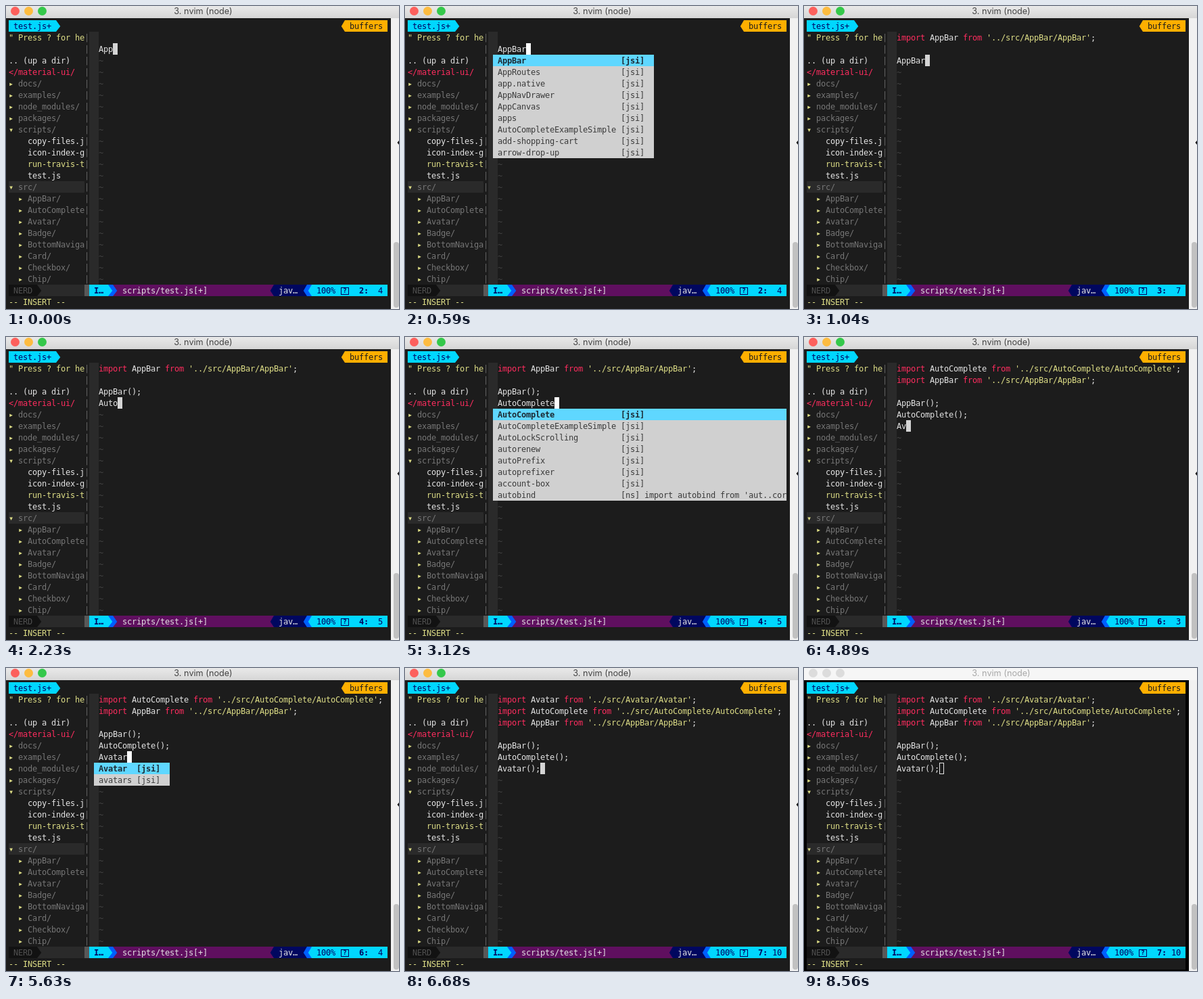
Animation of 581 by 448 pixels, one loop 8.66 s. Source, as an HTML page:

```html
<!DOCTYPE html>
<html lang="en">
<head>
<meta charset="utf-8">
<title>nvim</title>
<style>
html, body { margin: 0; width: 100%; height: 100%; overflow: hidden; }
#win { position: relative; width: 581px; height: 448px; overflow: hidden; background: #1c1c1c; }
#win * { position: absolute; box-sizing: border-box; }
#bar { left: 0; top: 0; width: 581px; height: 18px; background: linear-gradient(#e9e9e9, #d6d6d6); }
#title { left: 1px; width: 581px; top: -1px; text-align: center; color: #444; font: 12.7px/18px Inter, sans-serif; }
.light { top: .5px; width: 13px; height: 13px; border-radius: 50%; }
#scroll { left: 569px; top: 18px; width: 12px; height: 430px; background: #f1f1f1; }
#thumb { left: 4px; top: 331px; width: 8px; height: 97px; border-radius: 4px; background: #c1c1c1; }
#mouse { left: 577px; width: 10px; height: 14px; }
#edge { display: none; left: 0; top: 18px; width: 569px; height: 430px; border: solid #000; border-width: 3px 5px 2px 4px; }
.off #bar { background: #f6f6f6; }
.off #title { color: #a8a8a8; }
.off .light { background: #dcdcdc !important; }
.off #edge { display: block; }
.cell { height: 17px; padding-top: 1px; white-space: pre; overflow: hidden; color: #e4e4e4;
  font: 12px/17px "DejaVu Sans Mono", monospace; letter-spacing: calc(7px - 1ch); }
.yellow { color: #dfdf87; }
.red { color: #ff2d5f; }
.dir { color: #767676; }
.split { color: #666; }
.tilde { color: #444; }
.navy { color: #00005f; }
.bold { font-weight: bold; }
.pum { color: #3a3a3a; background: #d0d0d0; }
.pick { color: #1c2a33; background: #5fd7ff; font-weight: bold; }
.cursor { background: #d4d4d4; }
.bright { background: #fff; }
.hollow { background: none; border: 1px solid #e4e4e4; }
.unknown { left: 495px; top: 416px; width: 12px; height: 11px; border: 1px solid #00005f;
  color: #00005f; font: bold 9px/9px "DejaVu Sans Mono", monospace; text-align: center; }
</style>
</head>
<body>
<div id="win">
  <div id="base"></div>
  <div id="live"></div>
  <div id="edge"></div>
  <div id="bar">
    <div class="light" style="left:6.5px;background:#fc605c"></div>
    <div class="light" style="left:26.5px;background:#fdbc40"></div>
    <div class="light" style="left:46.5px;background:#34c84a"></div>
    <div id="title">3. nvim (node)</div>
  </div>
  <div id="scroll"><div id="thumb"></div></div>
  <svg id="mouse" viewBox="0 0 10 14"><path d="M1 7 6 1V13Z" fill="#000" stroke="#fff" stroke-width=".8"/></svg>
</div>
<script>
const LOOP = 8660, CYAN = '#00d7ff', BLUE = '#005fff', PURPLE = '#5f0f5f', NAVY = '#00075f';
const $ = id => document.getElementById(id);
const base = $('base'), live = $('live');

// Places text on the terminal grid; cells are 7 by 17 pixels.
function put(parent, row, col, text, cls = '', width = text.length) {
  const el = document.createElement('div');
  el.className = 'cell ' + cls;
  el.textContent = text;
  el.style.cssText = `left:${4 + col * 7}px;top:${21 + row * 17}px;width:${width * 7}px`;
  parent.append(el);
  return el;
}
function fill(row, col, width, color, rows = 1) {
  const el = put(base, row, col, '', '', width);
  el.style.background = color;
  el.style.height = rows * 17 + 'px';
}
function arrow(row, col, color, back, left) {
  fill(row, col, 1, back);
  const el = put(base, row, col, '', '', 1);
  el.style.background = color;
  el.style.clipPath = left ? 'polygon(100% 0, 25% 53%, 100% 100%)' : 'polygon(0 0, 90% 53%, 0 100%)';
}

function drawBase() {
  fill(0, 0, 10, CYAN);
  arrow(0, 10, CYAN, '#1c1c1c');
  put(base, 0, 1, 'test.js+', 'navy');
  arrow(0, 70, '#ffaf00', '#1c1c1c', true);
  fill(0, 71, 9, '#ffaf00');
  put(base, 0, 72, 'buffers').style.color = '#1c1c1c';

  fill(1, 17, 2, '#2a2a2a', 22);
  fill(14, 0, 16, '#2a2a2a');
  for (let r = 1; r < 23; r++) put(base, r, 16, '|', 'split');

  put(base, 1, 0, '" Press ? for he', 'yellow');
  put(base, 3, 0, '.. (up a dir)');
  put(base, 4, 0, '</material-ui/', 'red');
  const dir = (row, col, name, open) => {
    put(base, row, col, open ? '▾' : '▸', 'yellow');
    put(base, row, col + 2, name.slice(0, 14 - col), 'dir');
  };
  ['docs/', 'examples/', 'node_modules/', 'packages/'].forEach((d, i) => dir(5 + i, 0, d));
  dir(9, 0, 'scripts/', true);
  ['copy-files.j', 'icon-index-g', 'run-travis-t', 'test.js']
    .forEach((f, i) => put(base, 10 + i, 4, f, i === 2 ? 'yellow' : ''));
  dir(14, 0, 'src/', true);
  ['AppBar/', 'AutoComplete', 'Avatar/', 'Badge/', 'BottomNaviga', 'Card/', 'Checkbox/', 'Chip/']
    .forEach((d, i) => dir(15 + i, 2, d));

  fill(23, 0, 6, '#121212');
  arrow(23, 6, '#121212', '#2a2a2a');
  fill(23, 7, 9, '#2a2a2a');
  fill(23, 16, 1, '#585858');
  put(base, 23, 1, 'NERD').style.color = '#505050';
  fill(23, 17, 4, CYAN);
  put(base, 23, 18, 'I…', 'navy bold');
  arrow(23, 21, CYAN, BLUE);
  arrow(23, 22, BLUE, PURPLE);
  fill(23, 23, 32, PURPLE);
  put(base, 23, 24, 'scripts/test.js[+]');
  arrow(23, 55, NAVY, PURPLE, true);
  fill(23, 56, 6, NAVY);
  put(base, 23, 57, 'jav…');
  arrow(23, 62, BLUE, NAVY, true);
  arrow(23, 63, CYAN, BLUE, true);
  fill(23, 64, 16, CYAN);
  put(base, 23, 65, '100%', 'navy');
  const box = document.createElement('div');
  box.className = 'unknown';
  box.textContent = '?';
  base.append(box);
  put(base, 24, 0, '-- INSERT --', 'yellow');
}

const names = ['AppBar', 'AutoComplete', 'Avatar'];
const menus = [
  { width: 34, typed: 3, words: ['AppBar', 'AppRoutes', 'app.native', 'AppNavDrawer', 'AppCanvas', 'apps',
    'AutoCompleteExampleSimple', 'add-shopping-cart', 'arrow-drop-up'] },
  { width: 62, typed: 4, words: ['AutoComplete', 'AutoCompleteExampleSimple', 'AutoLockScrolling', 'autorenew',
    'autoPrefix', 'autoprefixer', 'account-box', 'autobind'] },
  { width: 16, typed: 3, words: ['Avatar', 'avatars'] }
];

// time, imports, finished calls, current text, menu (0 closed, 1 open, 2 first item picked)
const steps = [
  [0, 0, 0, 'App', 0], [150, 0, 0, 'App', 1], [450, 0, 0, 'AppBar', 1], [590, 0, 0, 'AppBar', 2],
  [890, 0, 0, 'AppBar', 0], [1040, 1, 0, 'AppBar', 0], [1330, 1, 0, 'AppBar();', 0],
  [1630, 1, 1, '', 0], [1930, 1, 1, 'A', 0], [2080, 1, 1, 'Aut', 0], [2230, 1, 1, 'Auto', 0],
  [2530, 1, 1, 'Auto', 1], [3120, 1, 1, 'AutoComplete', 2], [3420, 2, 1, 'AutoComplete', 0],
  [3710, 2, 1, 'AutoComplete();', 0], [4010, 2, 2, '', 0], [4460, 2, 2, 'A', 0],
  [4890, 2, 2, 'Av', 0], [5040, 2, 2, 'Ava', 0], [5190, 2, 2, 'Ava', 1], [5490, 2, 2, 'Avatar', 1],
  [5630, 2, 2, 'Avatar', 2], [6080, 2, 2, 'Avatar', 0], [6230, 3, 2, 'Avatar', 0],
  [6680, 3, 2, 'Avatar();', 0]
];

function drawImport(row, name) {
  const path = `'../src/${name}/${name}'`;
  let col = 19;
  for (const [text, cls] of [['import ', 'red'], [name + ' ', ''], ['from ', 'red'], [path, 'yellow'], [';', '']]) {
    put(live, row, col, text, cls);
    col += text.length;
  }
}

function drawMenu(row, menu, picked) {
  const pad = Math.max(...menu.words.map(w => w.length)) + 1;
  menu.words.forEach((word, i) => {
    const info = word === 'autobind' ? "[ns] import autobind from 'aut..cor" : '[jsi]';
    put(live, row + i, 18, ' ' + word.padEnd(pad) + info, picked && !i ? 'pick' : 'pum', menu.width);
  });
}

function drawLive([, imports, calls, text, open], hollow) {
  live.replaceChildren();
  for (let i = 0; i < imports; i++) drawImport(imports - i, names[i]);
  for (let i = 0; i < calls; i++) put(live, imports + 2 + i, 19, names[i] + '();');
  const row = imports + calls + 2, menu = menus[calls];
  put(live, row, 19, text);
  put(live, row, 19 + text.length, '', hollow ? 'hollow' : open ? 'bright' : 'cursor', 1);
  for (let r = row + 1; r < 23; r++) put(live, r, 19, '~', 'tilde');
  if (open) drawMenu(row + 1, menu, open === 2);
  const col = (open ? menu.typed : text.length) + 1;
  put(live, 23, 74, row + ':', 'navy bold');
  put(live, 23, 76, String(col).padStart(3), 'navy');
}

let shown = '';
function tick() {
  const t = performance.now() % LOOP;
  const step = steps.findLast(s => s[0] <= t), hollow = t >= 8170;
  const key = step[0] + '/' + hollow;
  if (key !== shown) {
    drawLive(step, hollow);
    shown = key;
  }
  const y = t < 7720 ? 202 : [260, 335, 425][Math.floor((t - 7720) / 150)];
  $('mouse').style.display = y ? 'block' : 'none';
  if (y) $('mouse').style.top = y - 7 + 'px';
  $('win').className = t >= 8560 ? 'off' : '';
  requestAnimationFrame(tick);
}

drawBase();
tick();
</script>
</body>
</html>
```
